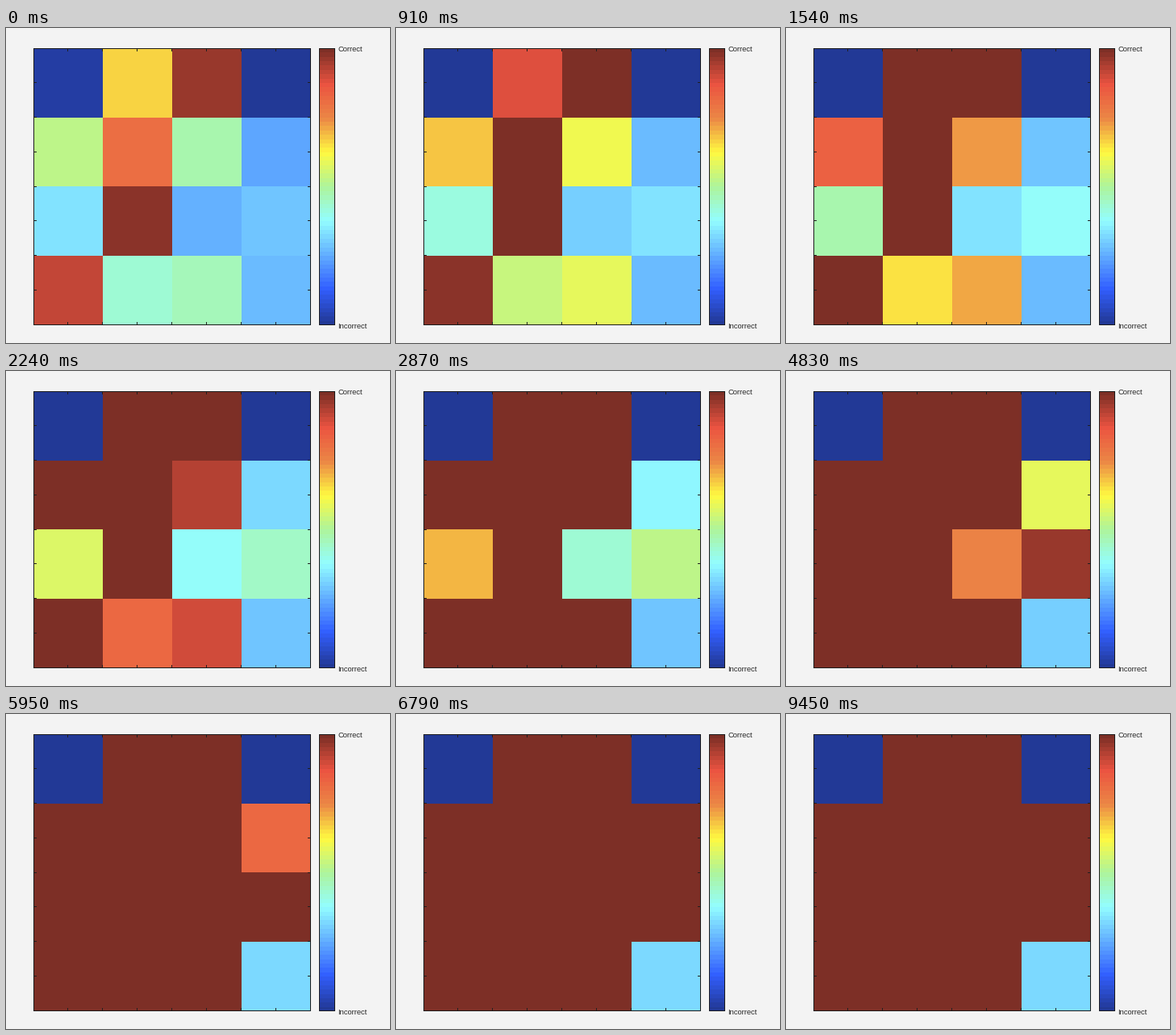
Write a matplotlib script that moves like this. It is 476 px wide and 390 px high and loops after 9.52 s.

```python
import numpy as np
import matplotlib.pyplot as plt
from matplotlib.animation import FuncAnimation
from matplotlib.colors import LinearSegmentedColormap
from matplotlib.patches import Rectangle

W, H, DPI = 476, 390, 100
STEP_MS, FRAMES = 70, 136
PX = 72 / DPI
LEFT, RIGHT, TOP, BOTTOM = 34, 377, 25, 367
BAR_LEFT, BAR_RIGHT = 388, 407

# Softened jet, given at its corners
CMAP = LinearSegmentedColormap.from_list("soft_jet", [
    (0, "#223996"), (0.125, "#325fff"), (0.375, "#93feff"), (0.5, "#aef59b"),
    (0.625, "#fffa41"), (0.75, "#ec8746"), (0.875, "#eb5441"), (1, "#7d2f26"),
], N=64)

# Levels above the threshold grow to 1, those below it shrink to 0
START = np.array([[0.02, 0.66, 0.955, 0],
                  [0.52, 0.81, 0.47, 0.245],
                  [0.34, 0.98, 0.265, 0.29],
                  [0.915, 0.43, 0.46, 0.27]])
THRESHOLD = 0.2
RATE = np.full((4, 4), 0.031)
RATE[::3, ::3] /= 5  # corners learn slowly

# Pauses: first held step and its length in steps
PAUSES = {17: 4, 26: 4, 32: 6, 41: 6, 63: 4, 71: 4, 79: 4, 90: 4}
LAST_STEP = 97


def grid_at(frame):
    step = min(frame, LAST_STEP)
    for first, length in PAUSES.items():
        if first <= step < first + length:
            step = first
    growth = np.exp(RATE * step)
    return np.clip(THRESHOLD + (START - THRESHOLD) * growth, 0, 1)


fig = plt.figure(figsize=(W / DPI, H / DPI), dpi=DPI, facecolor="#f3f3f3")
ax = fig.add_axes([0, 0, 1, 1])


def show(values, left, right):
    return ax.imshow(values, cmap=CMAP, vmin=0, vmax=1, aspect="auto",
                     interpolation="nearest",
                     extent=(left, right + 1, BOTTOM + 1, TOP))


def outline(left, right):
    ax.add_patch(Rectangle((left + 0.5, TOP + 0.5), right - left, BOTTOM - TOP,
                           fill=False, ec="#1c1c1c", lw=PX, zorder=3,
                           snap=False))


def tick(xs, ys):
    ax.plot(xs, ys, color="#202020", lw=PX, zorder=3, snap=False,
            solid_capstyle="butt")


cells = show(grid_at(0), LEFT, RIGHT)
show(np.linspace(1, 0, 64)[:, None], BAR_LEFT, BAR_RIGHT)
outline(LEFT, RIGHT)
outline(BAR_LEFT, BAR_RIGHT)

for k in range(1, 8):
    x = LEFT + (RIGHT - LEFT) * k // 8 + 0.5
    y = TOP + (BOTTOM - TOP) * k // 8 + 0.5
    for start in (TOP + 1, BOTTOM - 3):
        tick([x, x], [start, start + 3])
    for start in (LEFT + 1, RIGHT - 3):
        tick([start, start + 3], [y, y])

for label, baseline in (("Correct", TOP + 4), ("Incorrect", BOTTOM + 5)):
    ax.text(411, baseline, label, family="Liberation Sans", size=9.4 * PX,
            color="#262626", va="baseline")

ax.set_xlim(0, W)
ax.set_ylim(H, 0)
ax.axis("off")


def update(frame):
    cells.set_data(grid_at(frame))
    return [cells]


anim = FuncAnimation(fig, update, frames=FRAMES, interval=STEP_MS,
                     repeat=True, repeat_delay=0)
plt.show()
```
